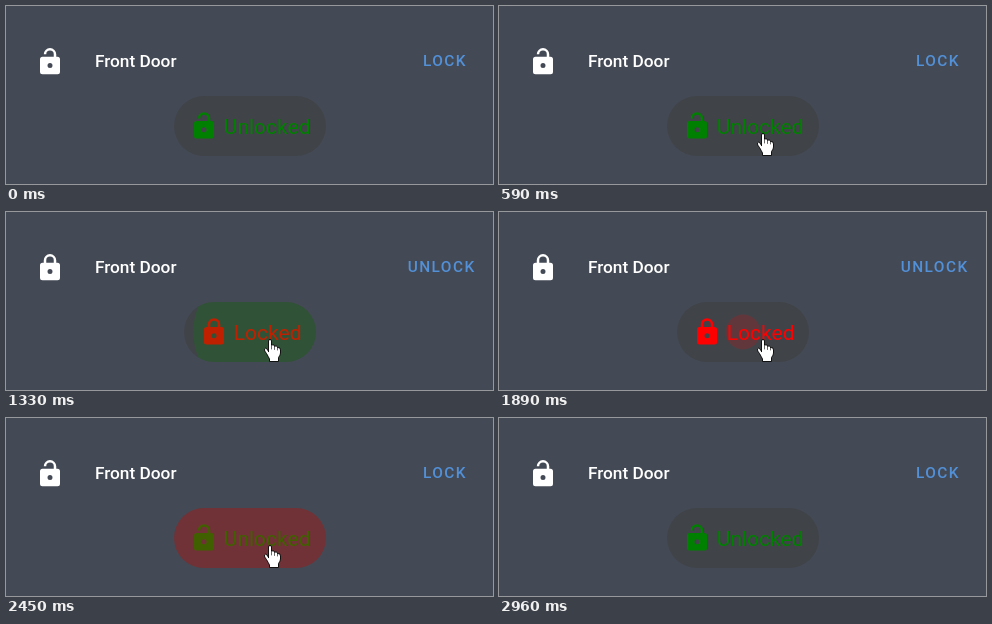
An HTML page that plays this animation: 487 by 178 pixels, repeating every 2990 ms.

```html
<!DOCTYPE html>
<html lang="en">
<head>
<meta charset="utf-8">
<style>
  html, body { margin: 0; height: 100%; overflow: hidden; background: #444a55; }
  svg { display: block; }
  text { font-family: Roboto, Arial, sans-serif; }
</style>
</head>
<body>
<svg width="487" height="178" viewBox="0 0 487 178">
  <defs>
    <clipPath id="clip"><rect id="clipBox" y="90" height="60" rx="30"/></clipPath>
  </defs>
  <path id="rowIcon" fill="#fff" transform="translate(29 40.8) scale(1.25)"/>
  <text x="88.9" y="61" font-size="17.3" font-weight="500" fill="#fff">Front Door</text>
  <text id="action" y="60" font-size="15.4" font-weight="500" letter-spacing="1.45" fill="#5290d8"></text>
  <rect id="pill" y="90" height="60" rx="30" fill="#404348"/>
  <g id="label">
    <path id="pillIcon"/>
    <text id="state" y="128" font-size="21"></text>
  </g>
  <g clip-path="url(#clip)"><circle id="ripple" cy="120"/></g>
  <g id="cursor" stroke="#000" stroke-linejoin="round" stroke-linecap="round">
    <path fill="#fff" stroke-width=".9" d="M4.5 12.5V2Q4.5 .5 6 .5T7.5 2V6Q10.5 5 10.5 7.2Q13.5 6 13.5 8.5Q16.5 8 16.5 11V14Q16.5 16 14.5 18.5V22.5H5.5V20Q4.5 18 2.5 14.5L.7 12Q0 9.5 1.5 9.2T4.5 12.5Z"/>
    <path fill="none" stroke-width=".6" d="M7.5 6V10M10.5 7.2V10.5M13.5 8.5V11"/>
  </g>
</svg>
<script>
const LOOP = 2990, LOCK_AT = 1330, UNLOCK_AT = 2450;

// The picture is refreshed only at these times (ms).
const STEPS = [0, 360, 400, 450, 500, 540, 590, 1250, 1290, 1330, 1380, 1510, 1560, 1610,
  1890, 1940, 1980, 2020, 2450, 2580, 2670, 2760, 2910, 2960];

const PRESSES = [
  { start: 1225, fade: 1460, end: 1610, color: "#008000" },
  { start: 1855, fade: 2540, end: 2760, color: "#f00" }
];

const BODY = "M18 8A2 2 0 0 1 20 10V20A2 2 0 0 1 18 22H6A2 2 0 0 1 4 20V10A2 2 0 0 1 6 8";
const HOLE = "M12 17A2 2 0 0 0 14 15A2 2 0 0 0 12 13A2 2 0 0 0 10 15A2 2 0 0 0 12 17Z";
const OPEN = BODY + "H15V6A3 3 0 0 0 9 6H7A5 5 0 0 1 17 6V8Z" + HOLE;
const SHUT = BODY + "H7V6A5 5 0 0 1 17 6V8ZM12 3A3 3 0 0 0 9 6V8H15V6A3 3 0 0 0 12 3Z" + HOLE;

const $ = id => document.getElementById(id);
const set = (id, attrs) => {
  for (const name in attrs) $(id).setAttribute(name, attrs[name]);
};
const clamp = v => Math.max(0, Math.min(1, v));

// cubic-bezier(.4, 0, .2, 1)
function ease(x) {
  let lo = 0, hi = 1;
  for (let i = 0; i < 20; i++) {
    const s = (lo + hi) / 2, r = 1 - s;
    if (1.2 * s * r * r + 0.6 * s * s * r + s * s * s < x) lo = s; else hi = s;
  }
  return lo * lo * (3 - 2 * lo);
}

function drawState(locked) {
  const x = locked ? 178 : 168, box = { x, width: 488 - 2 * x };
  const icon = locked ? SHUT : OPEN;
  set("pill", box);
  set("clipBox", box);
  set("rowIcon", { d: icon });
  set("pillIcon", { d: icon, transform: `translate(${x + 15} 105) scale(1.25)` });
  set("label", { fill: locked ? "#f00" : "#008000" });
  set("state", { x: x + 49.8 });
  set("action", { x: locked ? 401.7 : 416.9 });
  $("state").textContent = locked ? "Locked" : "Unlocked";
  $("action").textContent = locked ? "UNLOCK" : "LOCK";
}

function drawRipple(t) {
  const press = PRESSES.find(p => t >= p.start && t < p.end);
  if (!press) return set("ripple", { r: 0 });
  const age = t - press.start;
  const fadeOut = 1 - clamp((t - press.fade) / (press.end - press.fade));
  set("ripple", {
    cx: t >= LOCK_AT && t < 1610 ? 254 : 244,
    r: 12 + 75 * ease(clamp(age / 225)),
    fill: press.color,
    "fill-opacity": 0.25 * clamp(age / 50) * fadeOut
  });
}

function drawCursor(t) {
  const away = Math.pow(1 - clamp((t - 360) / 230), 1.5);
  const leaving = t >= 2910;
  const x = 258 + (leaving ? 3 : 8 * away);
  const y = 127 + (leaving ? 14 : 45 * away);
  set("cursor", {
    transform: `translate(${Math.round(x)} ${Math.round(y)})`,
    visibility: t >= 360 && t < 2960 ? "visible" : "hidden"
  });
}

function draw(now) {
  const time = Math.max(0, now) % LOOP;
  const t = STEPS.filter(s => s <= time).pop();
  drawState(t >= LOCK_AT && t < UNLOCK_AT);
  drawRipple(t);
  drawCursor(t);
}

const begin = performance.now();
function tick() {
  draw(performance.now() - begin);
  requestAnimationFrame(tick);
}
tick();
</script>
</body>
</html>
```
